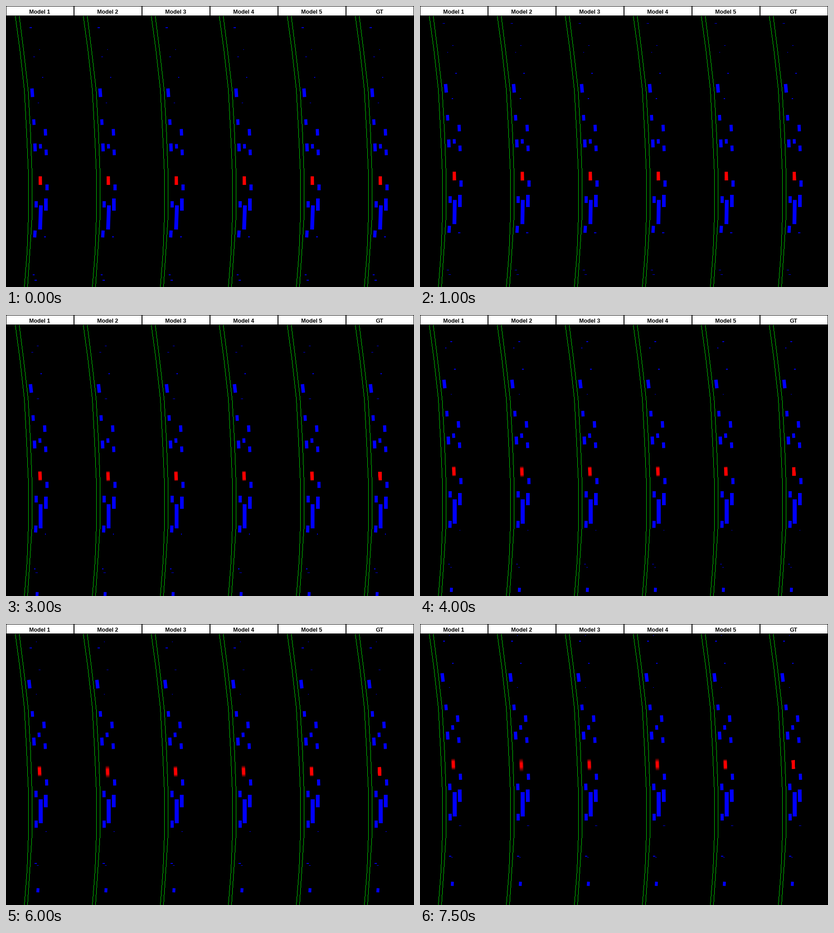
Write a matplotlib script that moves like this. It is 900 px wide and 622 px high and loops after 8000 ms.

```python
import numpy as np
import matplotlib.pyplot as plt
from matplotlib.animation import FuncAnimation
from matplotlib.collections import PolyCollection
from matplotlib.patches import Rectangle

W, H, DPI = 900, 622, 100
PANEL, HEAD = 150, 22
FRAMES, STEP = 16, 500
LABELS = ["Model 1", "Model 2", "Model 3", "Model 4", "Model 5", "GT"]
GREEN = (0, 0.84, 0)

# Key points of the two lane borders
ROAD_Y = [22, 95, 185, 280, 372, 465, 545, 622]
LEFT_X = [20, 30, 40, 45, 49, 49, 46, 40]
RIGHT_X = [28.8, 38, 48.3, 53.6, 57, 57, 52, 47]

# Distance from the right border -> (start y, speed, length); length 0 is a speck
TRAFFIC = {
    9.2: [(192, 4.91, 19), (257, 4.83, 12.5), (313, 4.4, 17.5),
          (439, 5.23, 14.5), (504.6, 5.15, 15.5)],
    21.3: [(310.5, 5.43, 10), (646.4, 4.75, 9.3)],
    30.7: [(439.3, 3.95, 27.5)],
    33.4: [(279.5, 4.67, 14.5), (324, 4.47, 12.5), (401.3, 4.21, 13.5)],
    22: [(48, 5, 0), (112.5, 4.97, 0), (215, 4.97, 0)],
    35.7: [(97, 4.77, 0), (158, 4.73, 0)],
    31.5: [(511, 4.3, 0)],
    12.2: [(595, 5.43, 0)],
    17.2: [(607, 6, 0)],
}
TRUCK_GAP, TRUCK_LEN = 19.3, 53.5

EGO_GAP, EGO_Y, EGO_SPEED = 18.7, 386.5, 5.03
SPREAD = [0.45, 0.72, 0.5, 0.6, 0.33, 0]
DRIFT = [-0.6, 1.2, 0.4, -0.1, 0, 0]


def border(y):
    return np.interp(y, ROAD_Y, RIGHT_X)


def heading(y):
    """Unit vector along the road, pointing down the panel."""
    d = np.array([(border(y + 20) - border(y - 20)) / 40, 1])
    return d / np.hypot(*d)


def car(gap, y, length):
    along = heading(y)
    across = np.array([along[1], -along[0]]) * min(8.4, 5.1 + 0.13 * length) / 2
    along = along * length / 2
    return np.array([-along - across, across - along, along + across, along - across]) \
        + (border(y) + gap, y)


def speck(gap, y, w, h):
    x, y = round(border(y) + gap - w / 2), round(y - h / 2)
    return np.array([(x, y), (x + w, y), (x + w, y + h), (x, y + h)])


def traffic(k):
    rng = np.random.default_rng(k)
    # The truck slows down for a moment, then catches up
    truck_y = np.interp(k, [0, 2, 6, 15], [468, 456, 445.5, 399])
    shapes = [car(TRUCK_GAP, truck_y, TRUCK_LEN)]
    for gap, row in TRAFFIC.items():
        for y0, speed, length in row:
            y = y0 - speed * k
            if length:
                shapes.append(car(gap, y, length))
            else:
                shapes.append(speck(gap, y, rng.integers(2, 6), rng.integers(1, 3)))
    return [s + (PANEL * i, 0) for i in range(len(LABELS)) for s in shapes]


def background():
    img = np.zeros((H, W, 3))
    rows = np.arange(HEAD, H)
    for i in range(len(LABELS)):
        x = PANEL * i
        img[1:HEAD - 1, x + 1:x + PANEL - 1] = 1
        for xs in (LEFT_X, RIGHT_X):
            cols = np.floor(x + np.interp(rows, ROAD_Y, xs) + 0.5).astype(int)
            img[rows, cols] = GREEN
    return img


BASE = background()
GX, GY = np.meshgrid(np.arange(W) + 0.5, np.arange(H) + 0.5)


def soft(d, half, blur):
    return np.clip((half + blur / 2 - np.abs(d)) / blur, 0, 1)


def scene(k):
    img = BASE.copy()
    for i, (spread, drift) in enumerate(zip(SPREAD, DRIFT)):
        y = EGO_Y - EGO_SPEED * k + drift * k / (FRAMES - 1)
        sx, sy = heading(y)
        dx, dy = GX - PANEL * i - border(y) - EGO_GAP, GY - y
        blur = spread * k
        img[..., 0] += (soft(dx * sy - dy * sx, 3.75, 0.3 + blur / 4)
                        * soft(dx * sx + dy * sy, 9.6, 0.3 + blur))
    return np.clip(img, 0, 1)


fig = plt.figure(figsize=(W / DPI, H / DPI), dpi=DPI, facecolor="black")
ax = fig.add_axes([0, 0, 1, 1])
ax.axis("off")
view = ax.imshow(scene(0), extent=(0, W, H, 0), interpolation="nearest", aspect="auto")
ax.set(xlim=(0, W), ylim=(H, 0))

cars = PolyCollection(traffic(0), facecolors="#0000ff", edgecolors="none", zorder=2)
ax.add_collection(cars, autolim=False)
cars.set_clip_path(Rectangle((0, HEAD), W, H - HEAD, transform=ax.transData))

for i, label in enumerate(LABELS):
    ax.text(PANEL * i + 74.5, 17, label, ha="center", va="baseline", color="black",
            family="Liberation Sans", weight="bold", size=12.4 * 72 / DPI)


def update(k):
    view.set_data(scene(k))
    cars.set_verts(traffic(k))
    return view, cars


anim = FuncAnimation(fig, update, frames=FRAMES, interval=STEP, repeat=True,
                     repeat_delay=0, blit=False)
plt.show()
```
